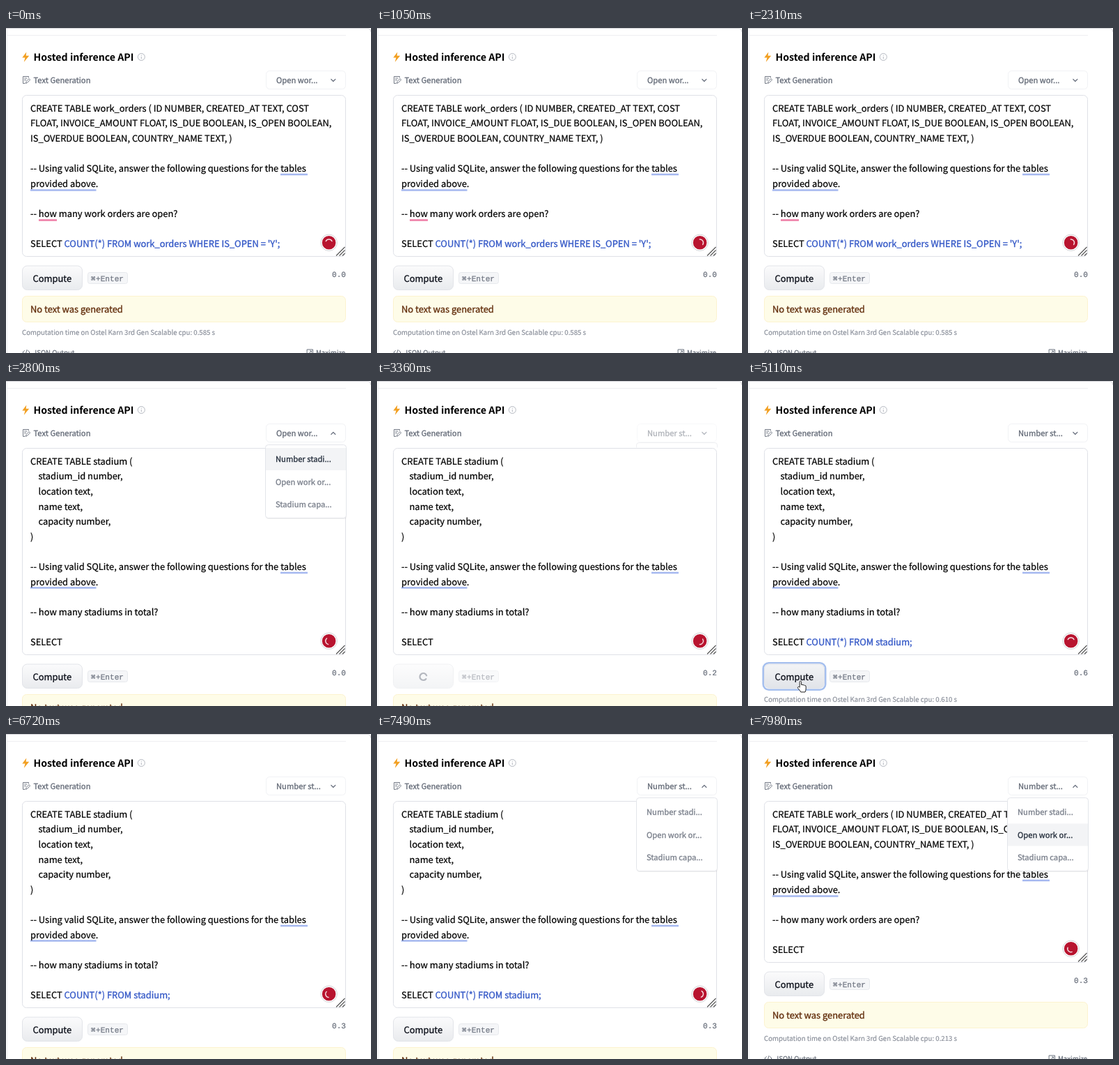
An HTML page for the animation above (8000 ms loop, 524 px wide and 466 px high).

```html
<!DOCTYPE html>
<html lang="en">
<head>
<meta charset="utf-8">
<title>Hosted inference API</title>
<style>
  html, body { margin: 0; width: 100%; height: 100%; overflow: hidden; background: #fff; }
  svg { display: block; width: 524px; height: 466px; }
  text { font-family: "Noto Sans CJK JP", "Noto Sans CJK SC", "Noto Sans CJK", sans-serif; font-size: 12.91px; white-space: pre; text-rendering: geometricPrecision; }
  .code { fill: #000; stroke: #000; stroke-width: .22; }
  .answer { fill: #3559c7; stroke: #3559c7; stroke-width: .35; }
  .mono { font-family: "Liberation Mono", "DejaVu Sans Mono", monospace; font-size: 11.1px; }
  .small { font-size: 11.2px; fill: #5f6673; stroke: #5f6673; stroke-width: .28; }
  .tiny { font-size: 9.67px; fill: #8b909b; stroke: #8b909b; stroke-width: .2; }
  .dark { fill: #666d79; stroke: #666d79; }
  .line { fill: none; stroke-linecap: round; stroke-linejoin: round; }
</style>
</head>
<body>
<svg viewBox="0 0 524 466" xmlns="http://www.w3.org/2000/svg">
  <defs>
    <linearGradient id="face" x2="0" y2="1"><stop stop-color="#fbfbfc"/><stop offset="1" stop-color="#e9ebee"/></linearGradient>
    <linearGradient id="faceHover" x2="0" y2="1"><stop stop-color="#f3f4f6"/><stop offset="1" stop-color="#e1e4e9"/></linearGradient>
  </defs>
  <rect width="524" height="466" fill="#fff"/>
  <path class="line" d="M0 .5H519Q523.5.5 523.5 5" stroke="#d4d4d8"/>
  <path d="M1.5 1V466M2 10.5H488" stroke="#eeeff2"/>

  <path d="M29.3 34.6L23.3 42.6H27.4L25.8 48.8L33.2 39.8H28.7Z" fill="#f2a023"/>
  <text x="39.5" y="47" style="font-size:14.15px;font-weight:600" fill="#000">Hosted inference API</text>
  <g stroke="#b4b8c0" fill="none"><circle cx="194.3" cy="41.5" r="5"/><path d="M194.3 41V44.4M194.3 38.6V39.8"/></g>
  <path class="line" d="M27 79.5H24.5V69.5H32.5V71M26.5 72H30M26.5 74.5H28.5M28.5 79L29.2 76.5L33 72.6L34.6 74.2L30.9 78.1Z" stroke="#757b87"/>
  <text class="small" x="39.5" y="79">Text Generation</text>

  <g id="select">
    <rect x="373.5" y="61.5" width="114" height="26" rx="5" fill="#fff" stroke="#f1f2f5"/>
    <text id="label" class="small" x="388" y="79"></text>
    <path id="chevron" class="line" stroke="#6b7280" stroke-width="1.2"/>
  </g>

  <rect id="area" x="23.5" y="96.5" width="464" rx="6" fill="#fff" stroke="#dfe1e7"/>
  <path id="selectFoot" class="line" d="M372.5 95V92Q372.5 88.5 376 88.5H485Q488.5 88.5 488.5 92V95" stroke="#eeeff2"/>
  <g id="work">
    <path d="M394 210H433M35 232.5H129.5" stroke="#a5b8f0" stroke-width="2.4"/>
    <path id="typo" d="M47 275.5H73" stroke="#ef7fa8" stroke-width="2.6"/>
  </g>
  <g id="stadium">
    <path d="M394 275H433M35 296.5H129.5" stroke="#a5b8f0" stroke-width="2.4"/>
  </g>

  <g id="lower">
    <path d="M474 326.5L486.5 314M478.5 326.5L486.5 318.5M483 326.5L486.5 323" stroke="#555" stroke-width="1.1"/>
    <circle cx="463.6" cy="307.8" r="11.7" fill="#fff" stroke="#d2d2d6"/>
    <circle cx="463.6" cy="307.8" r="9.8" fill="#b8142f"/>
    <path id="arc" class="line" d="M459.2 305.7A4.9 4.9 0 0 1 468 305.7" stroke="#f6dfe3" stroke-width="1.4"/>

    <rect id="ring" x="21.8" y="339.3" width="89.4" height="38.4" rx="8" fill="none" stroke="#a5bfee" stroke-width="2.6"/>
    <g id="button">
      <rect id="buttonFace" x="23.5" y="341" width="86" height="34.5" rx="7" stroke="#e2e4e9"/>
      <text id="compute" x="38.5" y="364.2" fill="#0b0f19" stroke="#0b0f19" stroke-width=".3">Compute</text>
      <path id="busy" class="line" d="M66.5 354A5 5 0 1 1 62.2 356.5" stroke="#6b7280" stroke-width="2.2"/>
      <rect x="117.5" y="350.5" width="57" height="16" rx="3" fill="#f5f6f8" stroke="#e7e9ed"/>
      <g fill="#757b87" stroke="#757b87" stroke-width=".3">
        <text class="mono" x="122" y="362.7" style="font-size:10.5px">⌘</text>
        <text class="mono" x="129" y="362.7">+Enter</text>
      </g>
    </g>
    <text id="timer" class="mono" x="488" y="357" text-anchor="end" fill="#5f6673" stroke="#5f6673" stroke-width=".15"></text>
    <g id="warning">
      <rect x="23.5" y="384.5" width="464" height="37" rx="6" fill="#fefce8" stroke="#fdf3cf"/>
      <text x="35" y="408" fill="#64300f" stroke="#64300f" stroke-width=".35">No text was generated</text>
    </g>
    <g id="footer">
      <text id="cost" class="tiny" x="23" y="440.2"></text>
      <path class="line" d="M26.5 462.5L24 465L26.5 467.5M31.5 462.5L34 465L31.5 467.5M30 461.5L28 468.5" stroke="#6b727e"/>
      <text class="tiny dark" x="39" y="469">JSON Output</text>
      <path class="line" d="M432.5 461H440.5V469H432.5ZM435.5 466L438.5 463M436.5 463H438.5V465" stroke="#6b727e"/>
      <text class="tiny dark" x="445" y="469">Maximize</text>
    </g>
  </g>

  <g id="menu">
    <rect x="373" y="93" width="116" height="105" rx="4" fill="#000" opacity=".06"/>
    <rect x="372.5" y="91.5" width="116" height="105" rx="4" fill="#fff" stroke="#e3e5ea"/>
    <rect id="hover" x="373" width="115" height="32" fill="#f3f4f6"/>
  </g>

  <path id="hand" class="line" d="M74.2 438.5V431.6Q74.2 430.2 75.4 430.2Q76.6 430.2 76.6 431.6V435.6Q78.2 434.6 79 436Q80.6 435.2 81.3 436.7Q83.2 436.2 83.2 438.2V441Q83.2 443.4 82 446H75.8Q74.6 443.4 71.6 440.6Q70.8 439 72.2 438.4Q73.2 438.1 74.2 439.4" style="fill:#fff" stroke="#222"/>
</svg>
<script>
const LOOP = 8000;
// Moments of the session, in ms
const OPEN = 2450, PREVIEW = 2600, PICK = 3150, ANSWER = 3760, READY = 4330,
      HAND = 4900, CLICK = 5110, RERUN = 5150, EMPTY = 5450, LEAVE = 5600,
      REOPEN = 7350, HOVER = 7630, NEXT = 7840;
const TYPE_MS = 25;
const HINT = ["-- Using valid SQLite, answer the following questions for the tables", "provided above.", ""];
const SAMPLES = {
  work: {
    lines: ["CREATE TABLE work_orders ( ID NUMBER, CREATED_AT TEXT, COST",
      "FLOAT, INVOICE_AMOUNT FLOAT, IS_DUE BOOLEAN, IS_OPEN BOOLEAN,",
      "IS_OVERDUE BOOLEAN, COUNTRY_NAME TEXT, )", "",
      ...HINT, "-- how many work orders are open?", "", "SELECT "],
    answer: "COUNT(*) FROM work_orders WHERE IS_OPEN = 'Y';"
  },
  stadium: {
    lines: ["CREATE TABLE stadium (", "    stadium_id number,", "    location text,", "    name text,",
      "    capacity number,", ")", "", ...HINT, "-- how many stadiums in total?", "", "SELECT "],
    answer: "COUNT(*) FROM stadium;"
  }
};
const ITEMS = ["Number stadi...", "Open work or...", "Stadium capa..."];
// Badge spinner: time, turned degrees
const TURNS = [[0, 0], [1050, 420], [2310, 780], [3360, 1200], [5110, 1800], [6720, 2410], [7980, 2745], [8000, 2752]];

const el = {};
document.querySelectorAll("[id]").forEach(n => el[n.id] = n);
const show = (node, on) => node.style.display = on ? "" : "none";
const within = (t, a, b) => t >= a && t < b;

function add(parent, tag, attrs, text = "") {
  const node = document.createElementNS("http://www.w3.org/2000/svg", tag);
  for (const key in attrs) node.setAttribute(key, attrs[key]);
  node.textContent = text;
  return parent.appendChild(node);
}

for (const name in SAMPLES) {
  const sample = SAMPLES[name];
  let last;
  sample.lines.forEach((line, i) => {
    const body = line.trimStart();
    last = add(el[name], "text", { class: "code", x: line === body ? 35 : 46.5, y: 119.7 + 21.6 * i }, body);
  });
  sample.out = add(last, "tspan", { class: "answer" });
}
const items = ITEMS.map((s, i) => add(el.menu, "text", { class: "small", x: 387, y: 116 + 32.5 * i }, s));

function turn(t) {
  const i = TURNS.findIndex(k => k[0] > t);
  const [a, b] = [TURNS[i - 1], TURNS[i]];
  return a[1] + (b[1] - a[1]) * (t - a[0]) / (b[0] - a[0]);
}

function seconds(t) {
  const count = (from, max) => Math.min(max, Math.floor((t - from) / 100) / 10);
  if (t < PICK) return 0;
  return t < RERUN ? count(PICK, .6) : count(RERUN, .3);
}

function draw(t) {
  const stadium = within(t, PREVIEW, NEXT);
  const loading = within(t, PICK, READY) || within(t, RERUN, EMPTY);
  const menu = within(t, OPEN, PICK) || t >= REOPEN;
  const warning = t < ANSWER || t >= EMPTY;
  const pressed = within(t, CLICK, RERUN);

  show(el.stadium, stadium);
  show(el.work, !stadium);
  show(el.typo, t < PREVIEW);
  SAMPLES.work.out.textContent = t < PREVIEW ? SAMPLES.work.answer : "";
  const typed = within(t, ANSWER, HOVER) ? Math.floor((t - ANSWER) / TYPE_MS) : 0;
  SAMPLES.stadium.out.textContent = SAMPLES.stadium.answer.slice(0, typed);

  el.area.setAttribute("height", stadium ? 296 : 231);
  el.lower.setAttribute("transform", `translate(0 ${stadium ? 65 : 0})`);
  el.arc.setAttribute("transform", `rotate(${turn(t)} 463.6 307.8)`);

  el.label.textContent = t < PICK ? "Open wor..." : "Number st...";
  el.chevron.setAttribute("d", menu ? "M466.8 76.5L469.8 73.5L472.8 76.5" : "M466.8 73.5L469.8 76.5L472.8 73.5");
  el.select.setAttribute("opacity", loading ? .5 : 1);
  show(el.selectFoot, within(t, PICK, READY));

  show(el.menu, menu);
  const row = within(t, PREVIEW, PICK) || within(t, HOVER, NEXT) ? 0 : t >= NEXT ? 1 : -1;
  show(el.hover, row >= 0);
  el.hover.setAttribute("y", row > 0 ? 128.5 : 96);
  items.forEach((n, i) => n.style.fill = n.style.stroke = i === row ? "#1f2937" : "#757b87");

  el.button.setAttribute("opacity", loading ? .5 : 1);
  el.buttonFace.setAttribute("fill", within(t, HAND, RERUN) ? "url(#faceHover)" : "url(#face)");
  show(el.compute, !loading);
  show(el.busy, loading);
  el.busy.setAttribute("transform", `rotate(${t * .36} 66.5 359)`);
  show(el.ring, pressed);
  show(el.hand, within(t, HAND, LEAVE));

  el.timer.textContent = seconds(t).toFixed(1);
  show(el.warning, warning);
  el.footer.setAttribute("transform", `translate(0 ${warning ? 0 : -45.5})`);
  const cost = t < ANSWER ? "0.585" : t < EMPTY ? "0.610" : "0.213";
  el.cost.textContent = `Computation time on Ostel Karn 3rd Gen Scalable cpu: ${cost} s`;
}

const start = performance.now();
function tick() {
  draw((performance.now() - start) % LOOP);
  requestAnimationFrame(tick);
}
tick();
</script>
</body>
</html>
```
